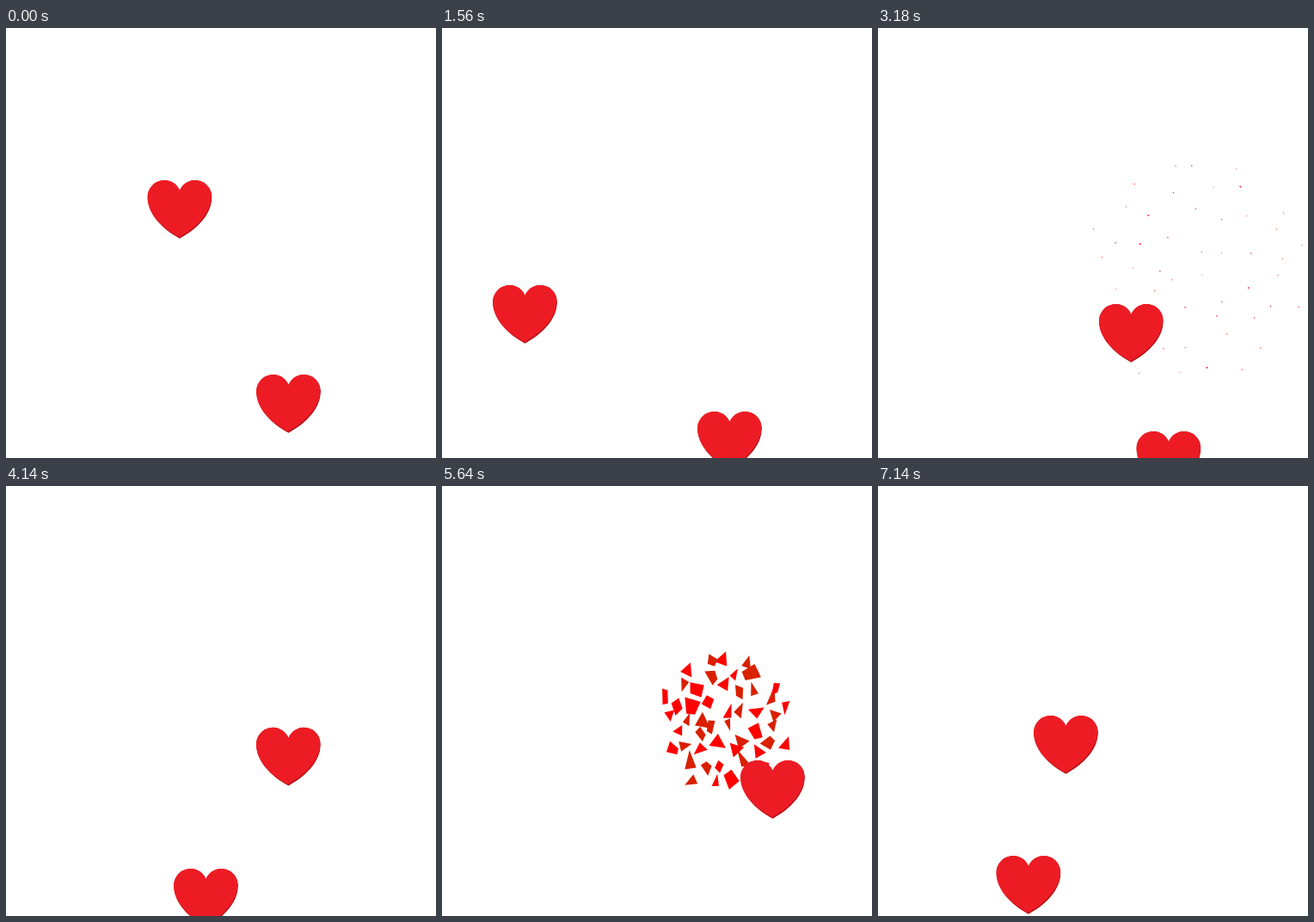
Write an HTML page with a canvas that moves like this. It is 500 by 500 pixels and loops after 7200 ms.

```html
<!DOCTYPE html>
<html lang="en">
<head>
<meta charset="utf-8">
<title>Bursting hearts</title>
<style>
  html, body { margin: 0; width: 100%; height: 100%; overflow: hidden; background: #fff; }
  canvas { display: block; width: 500px; height: 500px; }
</style>
</head>
<body>
<canvas id="stage" width="500" height="500"></canvas>
<script>
const ctx = document.getElementById('stage').getContext('2d');
const LOOP = 7200, STEP = 60, BURST = 575, SHARDS = 50;
const toStep = t => Math.floor(t / STEP) * STEP;

// A heart passes (x, y) at time t; drift and rise are in pixels per second.
const heart = (t, x, y, drift, rise) => ({ t, x, y, drift, rise });
const hearts = [
  heart(0, 202, 177, -80, 170),
  heart(0, 328.5, 403, 39, 170),
  heart(1560, 96.5, 299, 0, 170),
  heart(1560, 334.5, 446, 32, 182),
  heart(2580, 325, 420, -51, 165),
  heart(3180, 338, 469, -10, 196),
  heart(4140, 232.5, 445, 76, 162),
  heart(5640, 384.5, 319, 18, 185),
  heart(7140, 218.5, 267, -15, 170),
  heart(7140, 175, 430, -85, 170)
];
// One heart bursts about every 920 ms.
hearts.forEach((h, i) => { h.end = Math.max(STEP, toStep(920 * i - 120)); });

const shape = new Path2D('M0 12A19.5 19.5 0 0 0-37.5 19.5C-37.5 40-20 57 0 68' +
  'C20 57 37.5 40 37.5 19.5A19.5 19.5 0 0 0 0 12Z');

let seed = 11;
function rand() {
  seed = (seed * 16807) % 2147483647;
  return seed / 2147483647;
}
const between = (a, b) => a + (b - a) * rand();

// Shards fill a disc evenly along a golden-angle spiral.
function shard(_, i) {
  const r = 78 * Math.sqrt((i + 0.5) / SHARDS), a = i * 2.4;
  const n = rand() < 0.5 ? 3 : 4, turn = between(0, 6.28);
  const size = between(8, 12), thin = between(0.5, 1);
  const points = Array.from({ length: n }, (_, k) => {
    const b = turn + (k + between(0, 0.5)) * 6.28 / n;
    const d = size * between(0.8, 1.2);
    return [Math.cos(b) * d * thin, Math.sin(b) * d];
  });
  return {
    x: r * Math.cos(a) + between(-6, 6),
    y: r * Math.sin(a) + between(-6, 6),
    color: rand() < 0.58 ? '#d92000' : '#ff0000',
    spin: between(-2, 2),
    points
  };
}
const shards = Array.from({ length: SHARDS }, shard);

function place(h, time) {
  const s = (time - h.t) / 1000;
  return [h.x + h.drift * s, h.y - h.rise * s];
}

function drawHeart(x, y) {
  ctx.save();
  ctx.translate(x, y);
  ctx.clip(shape);
  ctx.fillStyle = '#b8121a';
  ctx.fill(shape);
  ctx.translate(-0.7, -1.8);
  ctx.fillStyle = '#ed1c24';
  ctx.fill(shape);
  ctx.fillRect(-30, 0, 60, 30);
  ctx.restore();
}

function drawBurst(x, y, age) {
  const spread = 0.43 + 0.57 * age / 240;
  const scale = (1 - age / BURST) * 1.72;
  for (const p of shards) {
    ctx.save();
    ctx.translate(x + p.x * spread, y + p.y * spread);
    ctx.rotate(p.spin * age / 1000);
    ctx.scale(scale, scale);
    ctx.fillStyle = p.color;
    ctx.beginPath();
    for (const [px, py] of p.points) ctx.lineTo(px, py);
    ctx.fill();
    ctx.restore();
  }
}

function draw(time) {
  ctx.fillStyle = '#fff';
  ctx.fillRect(0, 0, 500, 500);
  for (const h of hearts) {
    const age = time - h.end;
    if (age < 0 || age >= BURST) continue;
    const [x, y] = place(h, h.end);
    drawBurst(x, y + 34, age);
  }
  for (const h of hearts) {
    if (time >= h.end) continue;
    const [x, y] = place(h, time);
    if (y < 500) drawHeart(x, y);
  }
}

const start = performance.now();
function tick() {
  draw(toStep((performance.now() - start) % LOOP));
  requestAnimationFrame(tick);
}
tick();
</script>
</body>
</html>
```
